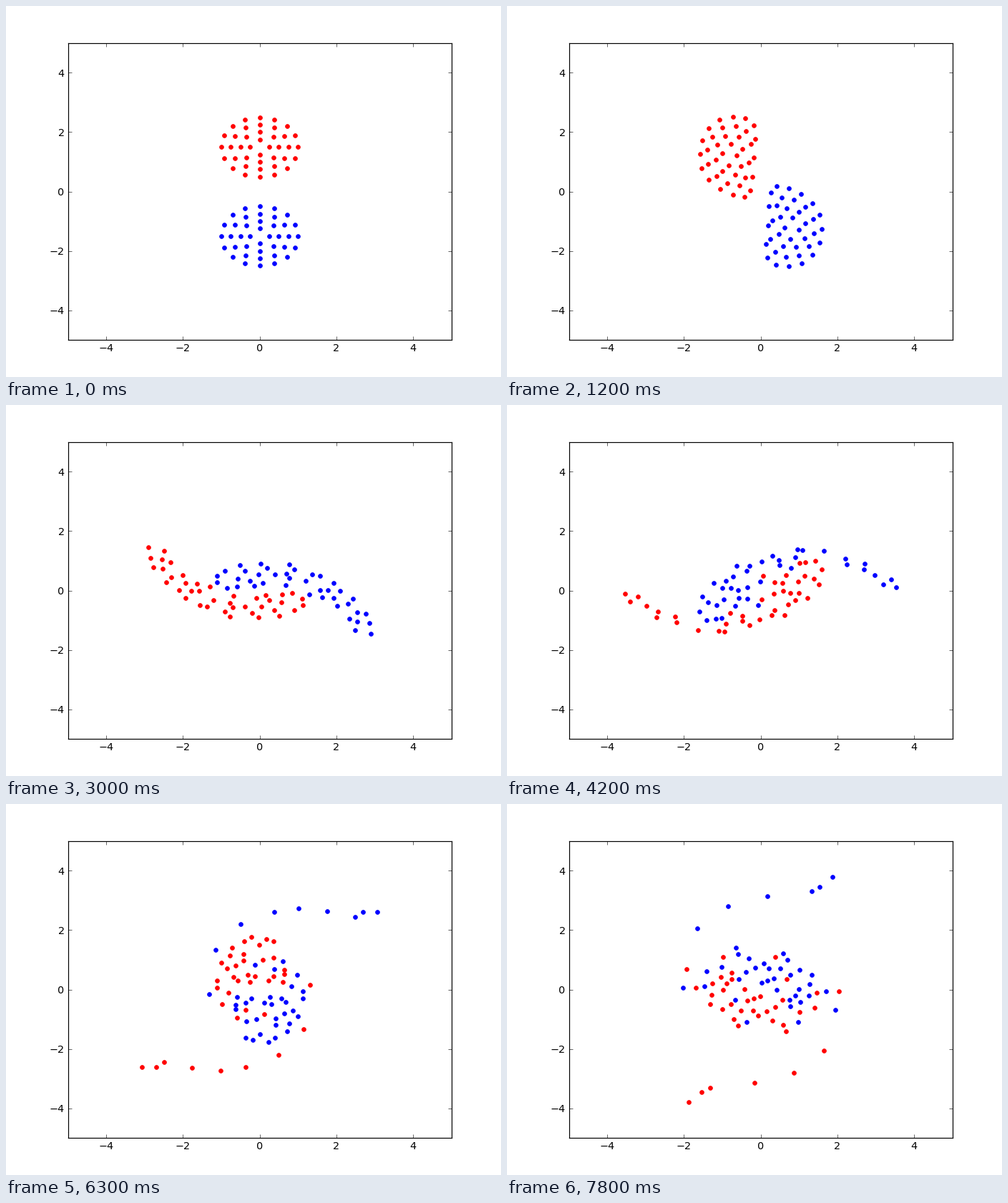
A matplotlib script that plays this animation: 692x519 px, repeating every 8000 ms.

```python
import numpy as np
import matplotlib.pyplot as plt
from matplotlib.animation import FuncAnimation

WIDTH, HEIGHT, DPI = 692, 519, 86.5
POSES = 27            # distinct positions shown in one loop
TICKS_PER_POSE = 3    # each pose is held for 3 x 100 ms
SUBSTEPS = 100
DT = 0.001
CIRCULATION = 1.0

plt.rcParams.update({
    "font.family": "DejaVu Sans",
    "font.size": 12,
    "axes.linewidth": 1.0,
})


def disc(center):
    """Concentric rings of 4, 8, 12 and 16 points around a complex center."""
    rings = [0.25 * n * np.exp(2j * np.pi * np.arange(4 * n) / (4 * n))
             for n in range(1, 5)]
    return center + np.concatenate(rings)


def velocity(z):
    """Velocity of every point vortex induced by all the others."""
    gap = z[:, None] - z[None, :]
    np.fill_diagonal(gap, np.inf)
    return 1j * CIRCULATION / (2 * np.pi) * np.conj((1 / gap).sum(axis=1))


def simulate():
    """Explicit Euler path of both vortex discs, sampled once per pose."""
    z = np.concatenate([disc(1.5j), disc(-1.5j)])
    poses = [z]
    for _ in range(POSES - 1):
        for _ in range(SUBSTEPS):
            z = z + DT * velocity(z)
        poses.append(z)
    return poses


poses = simulate()
half = len(poses[0]) // 2

fig = plt.figure(figsize=(WIDTH / DPI, HEIGHT / DPI), dpi=DPI, facecolor="white")
ax = fig.add_axes([0.125, 0.1, 0.775, 0.8])
ax.set(xlim=(-5, 5), ylim=(-5, 5),
       xticks=range(-4, 5, 2), yticks=range(-4, 5, 2))
ax.tick_params(direction="in", length=4, width=0.5, pad=4, top=True, right=True)


def dots(color):
    return ax.plot([], [], "o", color=color, markersize=5,
                   markeredgecolor=color, markeredgewidth=0.5)[0]


red, blue = dots("#ff0000"), dots("#0000ff")


def update(tick):
    z = poses[tick // TICKS_PER_POSE]
    red.set_data(z[:half].real, z[:half].imag)
    blue.set_data(z[half:].real, z[half:].imag)
    return red, blue


anim = FuncAnimation(fig, update, frames=80, interval=100,
                     repeat=True, repeat_delay=0, blit=False)
plt.show()
```
